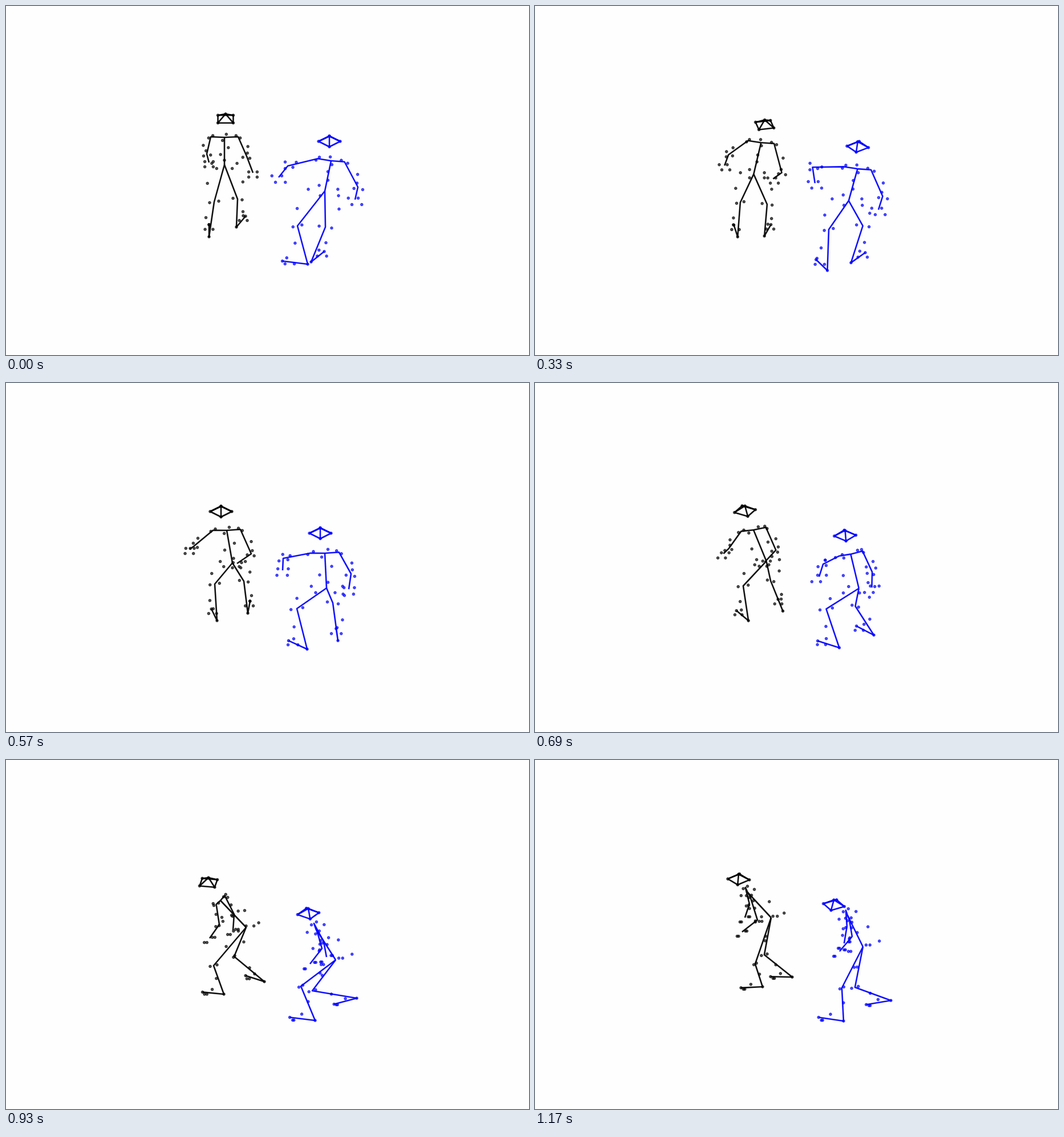
An HTML page with a canvas that plays this animation: 917 px wide and 611 px high, repeating every 1200 ms.

```html
<!DOCTYPE html>
<html lang="en">
<head>
<meta charset="utf-8">
<title>Two walkers</title>
<style>
  html, body { margin: 0; width: 100%; height: 100%; overflow: hidden; background: #fefefe; }
  canvas { display: block; }
</style>
</head>
<body>
<canvas id="stage" width="917" height="611"></canvas>
<script>
const ctx = document.getElementById('stage').getContext('2d');
const LOOP = 1200, STEP = 30;
const KEYS = [0, 210, 570, 930, 1170];
const BONES = [
  'h0 h1 h2 h3 h0', 'top h0', 'top h1', 'top h2', 'top h3',
  'neck mid hip', 'neck sL eL wL', 'neck sR eR wR',
  'hip kL aL tL', 'hip kR aR tR'
].map(chain => chain.split(' '));
const DOTS = 'h0 h1 h2 h3 top aL tL aR tR'.split(' ');

// Key points: x, y pairs. Turns in degrees: body yaw, head spin, left and right foot.
const dark = {
  color: '#000', size: 0.8, foot: 38, span: 24,
  turns: {
    yaw: [0, -22, 5, 72, 100], spin: [45, 45, 0, -35, 5],
    L: [0, 10, 15, 80, 95], R: [-25, -20, -6, 60, 88]
  },
  points: {
    head: [385,198, 410,200, 377,225, 355,215, 357,209],
    neck: [383,230, 398,230, 387,258, 376,246, 373,232],
    hip: [383,278, 379,283, 397,315, 421,293, 414,276],
    eL: [352,259, 347,250, 329,286, 374,288, 390,280],
    wL: [356,274, 341,275, 322,291, 357,312, 363,301],
    eR: [422,263, 431,284, 430,299, 400,270, 376,252],
    wR: [433,292, 424,295, 405,316, 398,298, 368,276],
    kL: [365,343, 358,341, 366,352, 364,360, 386,357],
    aL: [356,404, 350,399, 370,416, 382,410, 399,397],
    kR: [406,338, 402,346, 417,347, 400,344, 402,341],
    aR: [404,387, 395,400, 424,403, 453,388, 451,380]
  }
};
const blue = {
  color: '#00f', size: 1, foot: 46, span: 25,
  turns: {
    yaw: [-20, -25, 5, 97, 97], spin: [0, 10, 0, -10, 15],
    L: [75, 25, 45, 75, 72], R: [-30, -42, 4, 120, 110]
  },
  points: {
    head: [567,237, 571,239, 551,263, 530,269, 524,254],
    neck: [570,271, 568,278, 559,298, 543,295, 548,272],
    hip: [559,324, 547,331, 562,359, 578,350, 575,327],
    eL: [494,280, 491,273, 486,307, 554,330, 556,309],
    wL: [478,300, 494,303, 485,328, 533,357, 534,335],
    eR: [617,317, 610,330, 605,334, 557,318, 547,291],
    wR: [612,339, 602,352, 601,361, 562,345, 542,321],
    kL: [511,385, 517,389, 510,395, 517,396, 538,399],
    aL: [529,452, 509,460, 528,466, 542,456, 541,457],
    kR: [560,387, 572,386, 573,385, 537,404, 561,398],
    aR: [535,448, 542,447, 582,451, 615,417, 624,421]
  }
};

const rad = deg => deg * Math.PI / 180;
const mix = (a, b, u) => [a[0] + (b[0] - a[0]) * u, a[1] + (b[1] - a[1]) * u];
const shift = (p, dx, dy) => [p[0] + dx, p[1] + dy];

// Cubic Hermite curve through the key values
function spline(v, t) {
  const last = KEYS.length - 1;
  const slope = k => {
    const a = Math.max(k - 1, 0), b = Math.min(k + 1, last);
    return (v[b] - v[a]) / (KEYS[b] - KEYS[a]);
  };
  let i = 0;
  while (i < last - 1 && t >= KEYS[i + 1]) i++;
  const d = KEYS[i + 1] - KEYS[i], u = (t - KEYS[i]) / d, w = 1 - u;
  return v[i] * w * w * (1 + 2 * u) + v[i + 1] * u * u * (3 - 2 * u)
    + d * u * w * (w * slope(i) - u * slope(i + 1));
}

function pose({ points, turns, foot, span }, t) {
  const at = {}, turn = {};
  for (const name in points) {
    at[name] = [0, 1].map(axis => spline(points[name].filter((_, i) => i % 2 === axis), t));
  }
  for (const name in turns) turn[name] = rad(spline(turns[name], t));

  for (let k = 0; k < 4; k++) {
    const a = turn.spin + Math.PI + k * Math.PI / 2;
    at['h' + k] = shift(at.head, 19 * Math.cos(a), 9.5 * Math.sin(a));
  }
  at.top = shift(at.head, 0, -9);
  at.mid = mix(at.neck, at.hip, 0.5);
  for (const [side, out] of [['L', -1], ['R', 1]]) {
    const dx = span * Math.cos(turn.yaw), dy = -8 * Math.sin(turn.yaw);
    at['s' + side] = shift(at.neck, out * dx, out * dy - 1);
    at['t' + side] = shift(at['a' + side], -foot * Math.sin(turn[side]), -21 * Math.cos(turn[side]));
  }
  return { at, yaw: turn.yaw };
}

// Markers sit in rings round the joints and turn with the body
function markers(at, yaw, size) {
  const list = [];
  const ring = (p, n, rx, ry, phase, out = 1) => {
    for (let i = 0; i < n; i++) {
      const a = rad(phase + i * 360 / n);
      list.push(shift(p, size * rx * Math.cos(a + out * yaw) * out, size * ry * Math.sin(a)));
    }
  };
  ring(at.neck, 2, 16, 7, 105);
  ring(at.mid, 2, 25, 8, 110);
  ring(at.hip, 5, 29, 10, -18);
  for (const [side, out] of [['L', -1], ['R', 1]]) {
    const [s, e, w, k, a, toe] = [...'sewkat'].map(c => at[c + side]);
    const beside = (p, gap) => list.push(shift(p, out * gap * size * Math.cos(yaw), 0));
    ring(s, 2, 6, 4, 40, out);
    beside(mix(s, e, 0.5), 12);
    ring(e, 3, 9, 7, 40, out);
    ring(shift(w, 0, 3), 4, 13, 8, 45, out);
    beside(mix(at.hip, k, 0.5), 26);
    ring(k, 2, 11, 4, 25, out);
    beside(mix(k, a, 0.45), 13);
    ring(mix(toe, a, 0.25), 3, 10, 7, 30, out);
  }
  return list;
}

function draw(walker, t) {
  const { at, yaw } = pose(walker, t);
  ctx.strokeStyle = ctx.fillStyle = walker.color;
  ctx.lineJoin = 'round';
  ctx.globalAlpha = 0.93;
  ctx.lineWidth = 2.6;
  for (const chain of BONES) {
    ctx.beginPath();
    for (const name of chain) ctx.lineTo(...at[name]);
    ctx.stroke();
  }
  ctx.globalAlpha = 0.7;
  ctx.lineWidth = 1;
  for (const [x, y] of [...markers(at, yaw, walker.size), ...DOTS.map(name => at[name])]) {
    ctx.beginPath();
    ctx.arc(x, y, 2.3, 0, 2 * Math.PI);
    ctx.fill();
    ctx.stroke();
  }
}

let start;
function frame(now) {
  start ??= now;
  const t = Math.floor(((now - start) % LOOP) / STEP) * STEP;
  ctx.globalAlpha = 1;
  ctx.fillStyle = '#fefefe';
  ctx.fillRect(0, 0, 917, 611);
  draw(dark, t);
  draw(blue, t);
  requestAnimationFrame(frame);
}
requestAnimationFrame(frame);
</script>
</body>
</html>
```
